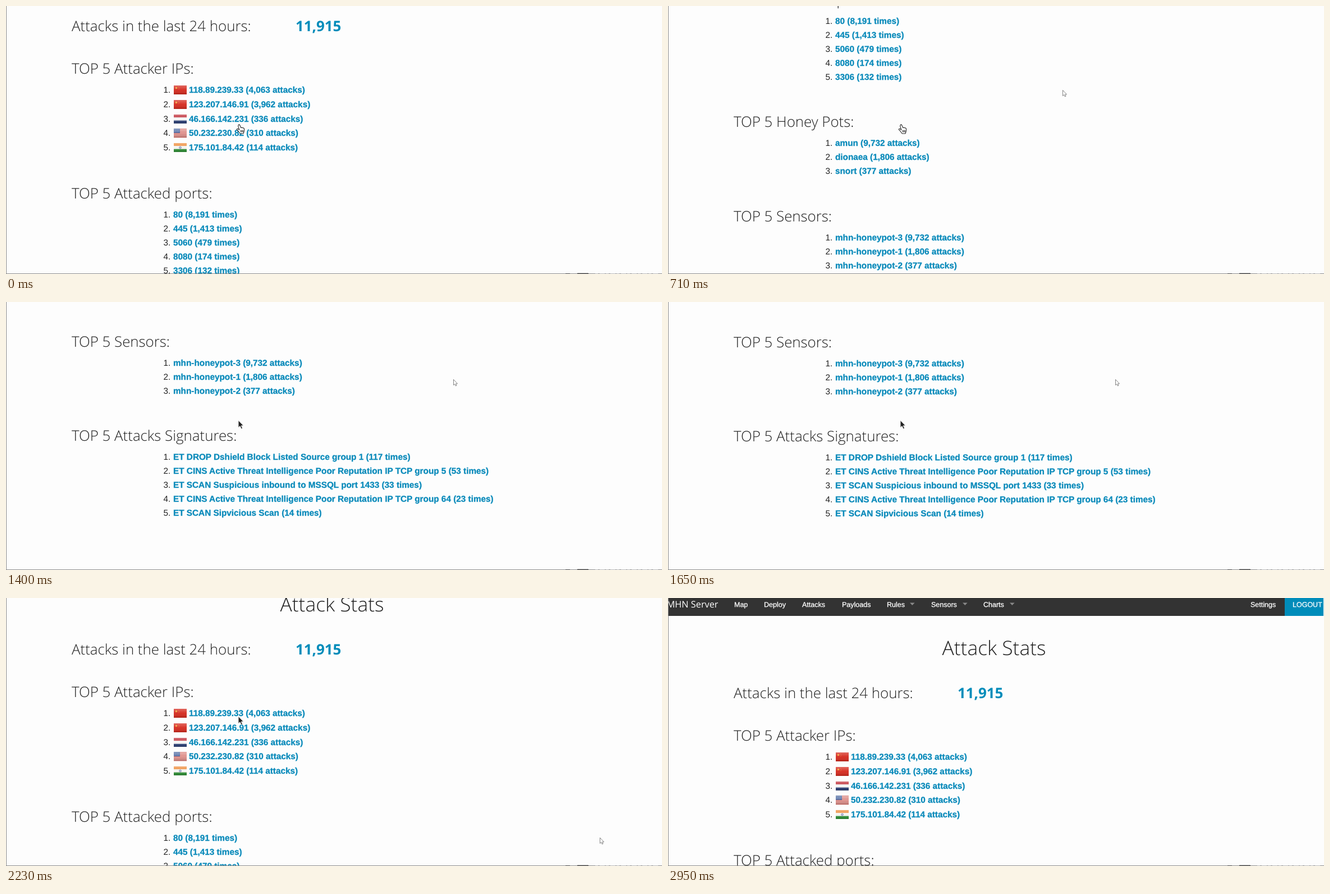
These frames come from a looping animation (1169 px wide and 479 px high, 3050 ms). An HTML page:

```html
<!DOCTYPE html>
<html lang="en">
<head>
<meta charset="utf-8">
<title>Attack Stats</title>
<style>
  html, body { margin: 0; width: 100%; height: 100%; overflow: hidden; background: #fdfdfd; }
  svg { display: block; width: 1169px; height: 479px; }
  text { text-rendering: geometricPrecision; white-space: pre; }
  .head, .title, .total { font-family: "Open Sans", sans-serif; font-size: 25.85px; font-weight: 300; fill: #222; }
  .title { font-size: 35.4px; text-anchor: middle; }
  .total { font-weight: 700; fill: #008cba; }
  .num, .link { font: 15.32px "Liberation Sans", Arial, sans-serif; fill: #222; }
  .link { font-weight: 700; fill: #0a8aba; stroke: #0a8aba; stroke-width: .3px; }
  .nav text { font: 12.5px "Liberation Sans", Arial, sans-serif; fill: #fff; stroke: #fff; stroke-width: .3px; }
  .nav .brand { font: 16.3px "Open Sans", sans-serif; text-anchor: end; stroke: none; }

  #page, #main, #ghost, .hand, .arrow { animation: 3050ms step-end infinite; }
  #page { animation-name: scroll; }
  #main { animation-name: point; }
  #ghost { animation-name: drift; }
  .hand { animation-name: hand; }
  .arrow { animation-name: arrow; }

  @keyframes scroll {
    0% { transform: translateY(-134px); }
    8.19% { transform: translateY(-190px); }
    14.09% { transform: translateY(-331px); }
    23.27% { transform: translateY(-480px); }
    27.86% { transform: translateY(-600px); }
    32.13% { transform: translateY(-673px); }
    37.04% { transform: translateY(-750px); }
    41.31% { transform: translateY(-787px); }
    45.9% { transform: translateY(-785px); }
    54.09% { transform: translateY(-784px); }
    59.34% { transform: translateY(-778px); }
    63.6% { transform: translateY(-764px); }
    68.85% { transform: translateY(-430px); }
    73.11% { transform: translateY(-78px); }
    77.7% { transform: translateY(-18px); }
    81.63% { transform: translateY(4px); }
    86.88% { transform: translateY(1px); }
    91.8%, 100% { transform: translateY(0); }
  }
  @keyframes point {
    0% { transform: translate(414px, 211px); }
    81.63% { transform: translate(425px, 140px); }
    86.88% { transform: translate(455px, 50px); }
    91.8% { transform: translate(471px, 8px); visibility: visible; }
    96.72%, 100% { transform: translate(471px, 8px); visibility: hidden; }
  }
  @keyframes drift {
    0% { transform: translate(703px, 150px); visibility: hidden; }
    23.27% { transform: translate(703px, 150px); visibility: visible; }
    27.86% { transform: translate(775px, 134px); visibility: visible; }
    32.13% { transform: translate(799px, 131px); visibility: visible; }
    37.04% { transform: translate(799px, 133px); visibility: visible; }
    41.31% { transform: translate(798px, 136px); visibility: visible; }
    45.9% { transform: translate(797px, 138px); visibility: visible; }
    59.34% { transform: translate(960px, 310px); visibility: visible; }
    63.6% { transform: translate(1052px, 419px); visibility: visible; }
    68.85% { transform: translate(1056px, 424px); visibility: visible; }
    73.11% { transform: translate(1058px, 428px); visibility: visible; }
    77.7%, 100% { transform: translate(1058px, 428px); visibility: hidden; }
  }
  @keyframes hand { 0% { opacity: 1; } 41.31%, 100% { opacity: 0; } }
  @keyframes arrow { 0% { opacity: 0; } 41.31%, 100% { opacity: 1; } }
</style>
</head>
<body>
<svg viewBox="0 0 1169 479">
  <defs>
    <linearGradient id="gloss" x2="0" y2="1">
      <stop offset="0" stop-color="#fff" stop-opacity=".3"/>
      <stop offset=".5" stop-color="#fff" stop-opacity=".05"/>
      <stop offset="1" stop-color="#000" stop-opacity=".18"/>
    </linearGradient>
    <g id="cn">
      <path fill="#d5281c" d="M0 0h23v16H0z"/>
      <circle cx="4.5" cy="4.5" r="1.7" fill="#f0a030"/>
      <path stroke="#e8892c" stroke-dasharray="1 1.4" fill="none" d="M8 2q3 3 0 6"/>
    </g>
    <g id="nl">
      <path fill="#c0303a" d="M0 0h23v5.3H0z"/>
      <path fill="#f4f4f4" d="M0 5.3h23v5.4H0z"/>
      <path fill="#2b4078" d="M0 10.7h23V16H0z"/>
    </g>
    <g id="us">
      <path fill="#f3e6e4" d="M0 0h23v16H0z"/>
      <path stroke="#d0564e" stroke-width="1.3" d="M0 1h23M0 3.5h23M0 6h23M0 8.5h23M0 11h23M0 13.5h23M0 15.6h23"/>
      <path fill="#4a669f" d="M0 0h11v8H0z"/>
      <path stroke="#b9c6de" stroke-width=".8" stroke-dasharray="1 1.5" d="M1 2h9M2 4h8M1 6h9"/>
    </g>
    <g id="in">
      <path fill="#ef8d3c" d="M0 0h23v5.3H0z"/>
      <path fill="#f5f5f2" d="M0 5.3h23v5.4H0z"/>
      <path fill="#2f9236" d="M0 10.7h23V16H0z"/>
      <circle cx="11.5" cy="8" r="1.8" fill="#c9cde0" stroke="#5a66a5" stroke-width=".8"/>
    </g>
  </defs>

  <path fill="#fdfdfd" d="M0 0h1169v479H0z"/>
  <g id="page">
    <g class="nav">
      <path fill="#333" d="M0-60h1168v92H0z"/>
      <path fill="#008cba" d="M1099-60h69v92h-69z"/>
      <text class="brand" x="89.5" y="17">MHN Server</text>
    </g>
    <text class="title" x="581" y="102">Attack Stats</text>
    <text class="head" x="117" y="179">Attacks in the last 24 hours:</text>
    <text class="total" x="516" y="179">11,915</text>
  </g>

  <path fill="#8c8c8c" d="M0 0h1v479H0zM0 478h1169v1H0z"/>
  <path fill="#444" d="M997 478h8v1h-8zM1018 477.5h20v1.5h-20z"/>
  <path stroke="#bbb" stroke-dasharray="5 3 9 2" d="M1050 478.5h112"/>

  <g id="main">
    <path class="hand" fill="#fff" stroke="#222" stroke-width="1.1" stroke-linejoin="round"
      d="M.3 1.6Q1.6 0 2.7 2L4.6 6.6Q5.4 5.3 6.6 6.6 7.8 5.7 8.7 7.2 10.3 6.8 10.5 8.7L10.4 12.5 9 17H3.2L.2 13-2.6 9.8Q-2.8 8 -1 8.4L1.8 10.4-.3 3.6ZM4.4 11v3.6M6.4 11v3.6M8.3 11v3.6"/>
    <path class="arrow" fill="#222" stroke="#fff" stroke-width=".9"
      d="M0 .5V13.5L3 10.8 5.2 15.8 7.5 14.8 5.3 10H9.3Z"/>
  </g>
  <path id="ghost" fill="#fff" stroke="#666" stroke-width=".8" d="M.5.5V10.6L2.8 8.6 4.3 12 6 11.2 4.6 8H7.5Z"/>
</svg>
<script>
  const page = document.getElementById('page');
  const nav = page.querySelector('.nav');

  function add(parent, tag, attrs, label = '') {
    const el = document.createElementNS('http://www.w3.org/2000/svg', tag);
    for (const key in attrs) el.setAttribute(key, attrs[key]);
    el.textContent = label;
    parent.appendChild(el);
  }

  const menu = { Map: 118, Deploy: 171, Attacks: 239, Payloads: 310, Rules: 390, Sensors: 469, Charts: 562, Settings: 1038, LOGOUT: 1113 };
  for (const label in menu) add(nav, 'text', { x: menu[label], y: 15.5 }, label);
  for (const x of [431, 525, 609]) add(nav, 'path', { d: `M${x} 8.5h8.6l-4.3 4.5z`, fill: '#8a8a8a' });

  function section(label, y, first, step, rows, flags) {
    add(page, 'text', { class: 'head', x: 117, y }, label);
    rows.forEach((row, i) => {
      const base = first + i * step;
      add(page, 'text', { class: 'num', x: 280.5, y: base }, `${i + 1}.`);
      add(page, 'text', { class: 'link', x: flags ? 326 : 298, y: base }, row);
      if (!flags) return;
      const top = Math.round(base - 13);
      add(page, 'use', { href: '#' + flags[i], x: 299, y: top });
      add(page, 'rect', { x: 299, y: top, width: 23, height: 16, fill: 'url(#gloss)' });
    });
  }

  section('TOP 5 Attacker IPs:', 255, 289, 25.8, [
    '118.89.239.33 (4,063 attacks)',
    '123.207.146.91 (3,962 attacks)',
    '46.166.142.231 (336 attacks)',
    '50.232.230.82 (310 attacks)',
    '175.101.84.42 (114 attacks)',
  ], ['cn', 'cn', 'nl', 'us', 'in']);
  section('TOP 5 Attacked ports:', 478, 512, 25, [
    '80 (8,191 times)', '445 (1,413 times)', '5060 (479 times)', '8080 (174 times)', '3306 (132 times)',
  ]);
  section('TOP 5 Honey Pots:', 696, 730, 25, [
    'amun (9,732 attacks)', 'dionaea (1,806 attacks)', 'snort (377 attacks)',
  ]);
  section('TOP 5 Sensors:', 865, 899, 25, [
    'mhn-honeypot-3 (9,732 attacks)', 'mhn-honeypot-1 (1,806 attacks)', 'mhn-honeypot-2 (377 attacks)',
  ]);
  section('TOP 5 Attacks Signatures:', 1033, 1067, 25, [
    'ET DROP Dshield Block Listed Source group 1 (117 times)',
    'ET CINS Active Threat Intelligence Poor Reputation IP TCP group 5 (53 times)',
    'ET SCAN Suspicious inbound to MSSQL port 1433 (33 times)',
    'ET CINS Active Threat Intelligence Poor Reputation IP TCP group 64 (23 times)',
    'ET SCAN Sipvicious Scan (14 times)',
  ]);
</script>
</body>
</html>
```
